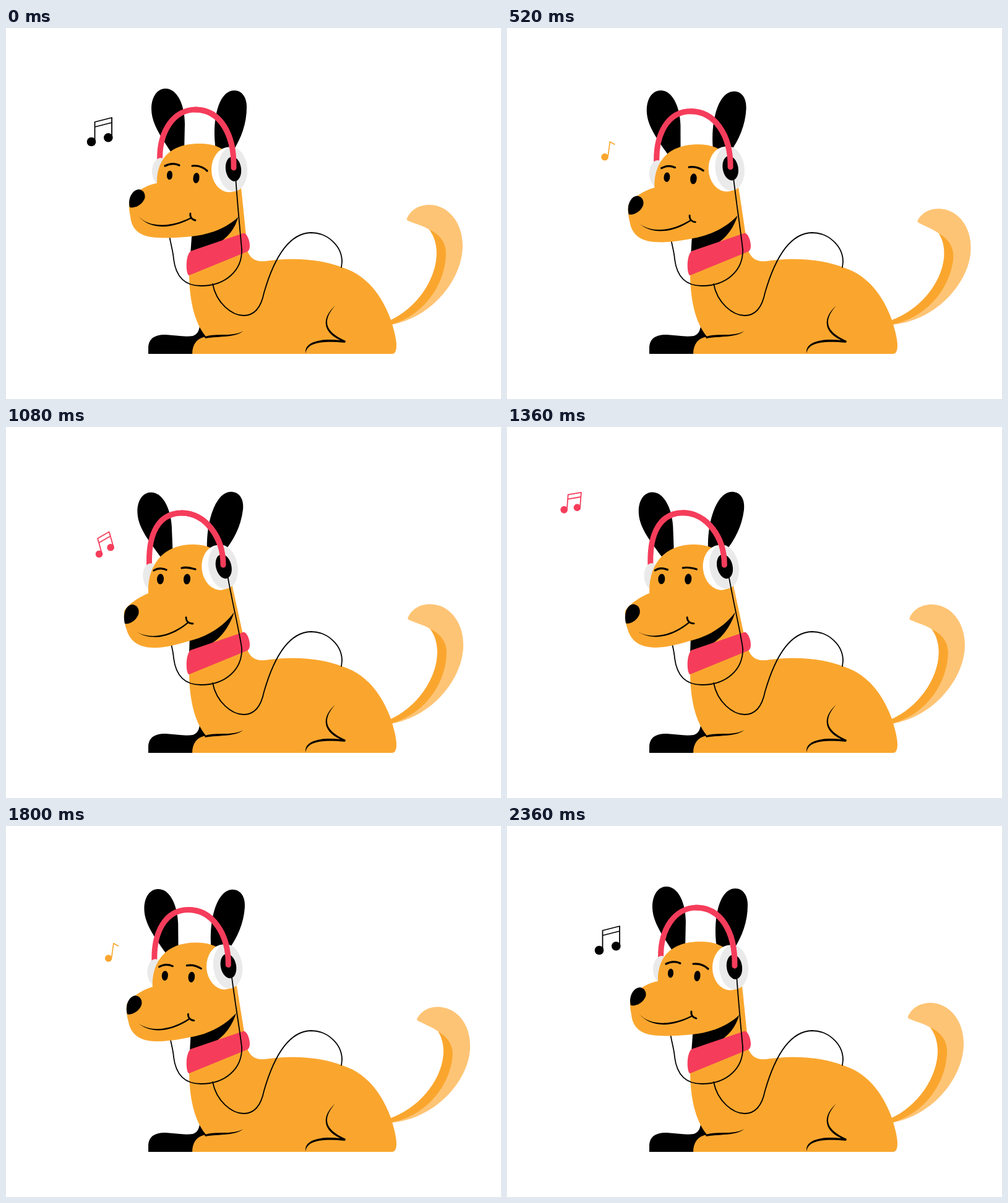
Recreate the animation shown at these times as an HTML page. Size 800 by 600 pixels, loop 2400 ms.

```html
<!DOCTYPE html>
<html lang="en">
<head>
<meta charset="utf-8">
<title>Dog with headphones</title>
<style>
html, body { margin: 0; width: 100%; height: 100%; overflow: hidden; background: #fff; }
svg { display: block; width: 100%; height: 100%; }
.fur { fill: #faa62e; }
.pink { fill: #f53d5b; }
.line { fill: none; stroke: #000; stroke-width: 1.8; stroke-linecap: round; }
.brow { fill: none; stroke: #000; stroke-width: 3.2; stroke-linecap: round; }
.band { fill: none; stroke: #f53d5b; stroke-width: 9; stroke-linecap: round; }
.note path { fill: none; stroke: currentColor; stroke-width: 1.8; stroke-linejoin: round; }
.note circle { fill: currentColor; }
</style>
</head>
<body>
<svg viewBox="0 0 800 600">
  <g id="tail">
    <path fill="#fec475" d="M648 308C655 292 670 286 684 286C715 286 738 315 738 352C738 405 690 468 622 480L619 474C664 454 696 406 696 364C696 350 692 336 684 326C675 320 662 317 653 313C649 312 647 310 648 308Z"/>
    <path class="fur" d="M684 326C702 334 711 348 711 364C711 408 682 462 622 480L618 474C664 454 696 406 696 364C696 350 692 336 684 326Z"/>
  </g>

  <path d="M230 527V516C231 502 240 496 258 496C274 497 288 500 302 498C310 495 312 489 313 482L340 500L320 527Z"/>
  <path class="fur" d="M296 396L388 352C392 372 402 379 420 377C452 372 502 371 543 387C591 402 612 445 622 472C627 488 631 503 631 514C631 521 629 527 624 527H301C301 512 308 502 323 499C303 475 296 435 296 396Z"/>
  <path d="M322 499C340 493 368 500 383 490C372 501 345 498 322 502L318 494Z"/>
  <path d="M532 449C512 472 513 490 549 506L548 509C511 506 487 508 484 526C482 506 511 502 540 505C512 492 509 470 532 449Z"/>

  <path d="M301 325L376 300L370 340L340 370L298 366Z" data-to="M297 335L369 294L365 340L335 370L296 366Z"/>
  <path class="fur" d="M376 304C370 325 358 340 340 350L330 370L390 368L388 336L380 258Z" data-to="M369 299C363 318 350 340 332 350L330 370L390 368L383 336L366 258Z"/>
  <path class="pink" d="M298 361L383 332C388 330 394 342 394 352C394 358 392 361 389 362L296 400C291 400 289 370 298 361Z"/>
  <path class="line" d="M381 358C382 392 355 417 315 417C286 417 274 398 271 374C270 360 266 350 264 335"/>
  <path class="line" d="M334 414C340 445 365 465 384 465C404 465 413 448 417 428C428 390 450 332 493 331C520 331 543 353 543 378L542 387"/>

  <path id="earL" d="M268 203C252 178 235 155 235 131C235 112 244 98 258 98C277 98 289 125 289 155L288 200Z"/>
  <path id="earR" d="M339 197C332 150 343 101 369 101C382 101 389 113 389 128C389 155 380 178 367 199Z"/>
  <path class="band" d="M249 222C245 165 273 132 306 132C345 132 369 170 368 226" data-to="M232 231C228 172 247 139 284 139C322 139 351 178 351 223"/>
  <g class="gear">
    <ellipse cx="250" cy="232" rx="14" ry="22" fill="#eaeaea"/>
  </g>

  <path class="fur" d="M244 251C243 221 257 187 313 187C345 187 375 200 380 262L376 305C352 328 320 335 300 337C280 339 262 340 245 339C215 338 203 325 201 305C199 295 198 285 200 278C205 268 225 254 244 251Z"
    data-to="M230 269C228 233 246 190 302 190C335 190 360 205 366 258L369 299C350 325 322 340 296 346C276 352 258 357 240 357C213 357 200 345 195 328C191 318 190 305 191 298C196 288 213 276 230 269Z"/>
  <path d="M200 290C196 275 205 261 215 261C223 262 226 270 224 276C220 286 208 292 200 290Z" data-to="M192 318C188 302 194 288 204 287C213 288 216 296 214 303C211 312 200 320 192 318Z"/>
  <path d="M214 304C228 321 262 325 299 306L300 308C262 328 230 324 214 304Z" data-to="M211 331C228 342 262 342 294 315L295 317C262 345 230 344 211 331Z"/>
  <path class="brow" style="stroke-width:2.8" d="M298 300C297 305 300 310 306 311" data-to="M291 308C291 314 295 318 302 318"/>
  <path d="M260 238A4.5 7 4 1 0 269 238A4.5 7 4 1 0 260 238Z" data-to="M244 246A5.5 8 4 1 0 255 246A5.5 8 4 1 0 244 246Z"/>
  <path d="M302.5 242.5A5 8 6 1 0 312.5 242.5A5 8 6 1 0 302.5 242.5Z" data-to="M287 246A5.5 8 6 1 0 298 246A5.5 8 6 1 0 287 246Z"/>
  <path class="brow" d="M257 223C265 219 272 218 280 222" data-to="M239 232C245 228 252 228 259 231"/>
  <path class="brow" d="M301 223C310 222 318 224 325 231" data-to="M284 228C292 226 299 228 306 230"/>

  <g class="gear">
    <ellipse cx="360.5" cy="229" rx="28.5" ry="36.5" fill="#fff"/>
    <ellipse cx="366.5" cy="228.5" rx="23.5" ry="36" fill="#eaeaea" transform="rotate(-4 366.5 228.5)"/>
    <ellipse cx="367.5" cy="228" rx="12.5" ry="20" transform="rotate(-8 367.5 228)"/>
  </g>
  <path class="band" d="M306 132C345 132 369 170 368 226" data-to="M284 139C322 139 351 178 351 223"/>
  <path class="line" d="M371 240C374 285 379 335 381 358" data-to="M358 240C367 290 378 335 381 358"/>

  <g class="note" id="black" color="#000">
    <circle r="7.3"/><circle cx="27.3" cy="-6.7" r="7.3"/>
    <path d="M5.5 0V-32L33 -39V-7M5.5 -24L33 -31"/>
  </g>
  <g class="note" id="pink" color="#f53d5b">
    <circle r="5.8"/><circle cx="21.5" r="5.8"/>
    <path d="M5 -1L10.5 -23H32L26.5 -1M8.8 -16H30.3"/>
  </g>
  <g class="note" id="gold" color="#faa62e">
    <circle r="6.2"/>
    <path d="M5.5 -1L9 -26.5L17.5 -21.5"/>
  </g>
</svg>
<script>
const LOOP = 2400, STEP = 40;
const $ = id => document.getElementById(id);
const wave = (t, period) => (1 - Math.cos(2 * Math.PI * t / period)) / 2;

const morphs = [...document.querySelectorAll('[data-to]')].map(el => {
  const from = el.getAttribute('d');
  const to = el.dataset.to.match(/-?[\d.]+/g).map(Number);
  return { el, from, to };
});
const gear = document.querySelectorAll('.gear');

function morph({ el, from, to }, k) {
  let i = 0;
  el.setAttribute('d', from.replace(/-?[\d.]+/g, n => {
    const v = +n + (to[i++] - n) * k;
    return +v.toFixed(3);
  }));
}

// Note keys: time, x, y, scale, angle
const goldKeys = [[1400, 240, 238, .2, 0], [1560, 213, 236, .64, 0], [1640, 196, 234, .86, 0],
  [2040, 121, 181, 1, 0], [2080, 115.5, 174, 1, 0], [2280, 93, 132, 1, 0]];
const notes = [
  { el: $('black'), shifts: [0], keys: [[1920, 237, 240, .2, 0], [2040, 215, 237.5, .5, 0],
    [2360, 149, 201, 1, 0], [2400, 138, 184, 1, 0], [2720, 106, 111, 1, 0], [2760, 104, 103, 1, 0]] },
  { el: $('pink'), shifts: [0], keys: [[720, 236, 236, .18, -42], [760, 229.5, 234.5, .29, -40],
    [1080, 150.5, 205.5, 1, -30], [1560, 53, 77, 1, 5], [1600, 49, 67.5, 1, 8]] },
  { el: $('gold'), shifts: [0, -1320], keys: goldKeys }
];

// Smooth curve through the keys
function sample(keys, t) {
  let i = 0;
  while (i < keys.length - 2 && t > keys[i + 1][0]) i++;
  const a = keys[i], b = keys[i + 1];
  const before = keys[i - 1] || a, after = keys[i + 2] || b;
  const d = b[0] - a[0], u = (t - a[0]) / d;
  return [1, 2, 3, 4].map(c => {
    if (c > 2) return a[c] + (b[c] - a[c]) * u;
    const m = d * (b[c] - before[c]) / (b[0] - before[0]);
    const n = d * (after[c] - a[c]) / (after[0] - a[0]);
    const w = b[c] - a[c];
    return a[c] + u * (m + u * (3 * w - 2 * m - n + u * (m + n - 2 * w)));
  });
}

function drawNote({ el, shifts, keys }, t) {
  const first = keys[0][0], last = keys[keys.length - 1][0];
  const ages = shifts.flatMap(s => [t - s, t - s + LOOP]);
  const age = ages.find(a => a >= first && a <= last);
  el.style.display = age === undefined ? 'none' : '';
  if (age === undefined) return;
  const [x, y, s, r] = sample(keys, age);
  el.setAttribute('transform', `translate(${x} ${y}) rotate(${r}) scale(${s})`);
}

function draw(t) {
  const k = wave(t, LOOP) / .976;
  morphs.forEach(m => morph(m, k));
  gear.forEach(g => g.setAttribute('transform', `rotate(${-6.3 * k} 337 370)`));
  $('earL').setAttribute('transform', `translate(${-18.5 * k} ${6.5 * k}) rotate(${-3.5 * k} 275 198)`);
  $('earR').setAttribute('transform', `translate(${-14 * k} ${k}) rotate(${7 * k} 350 195)`);
  $('tail').setAttribute('transform', `rotate(${5.6 * wave(t, LOOP / 2)} 624 478)`);
  notes.forEach(n => drawNote(n, t));
}

const start = performance.now();
function tick() {
  const t = Math.max(0, performance.now() - start) % LOOP;
  draw(Math.floor(t / STEP) * STEP);
  requestAnimationFrame(tick);
}
tick();
</script>
</body>
</html>
```
